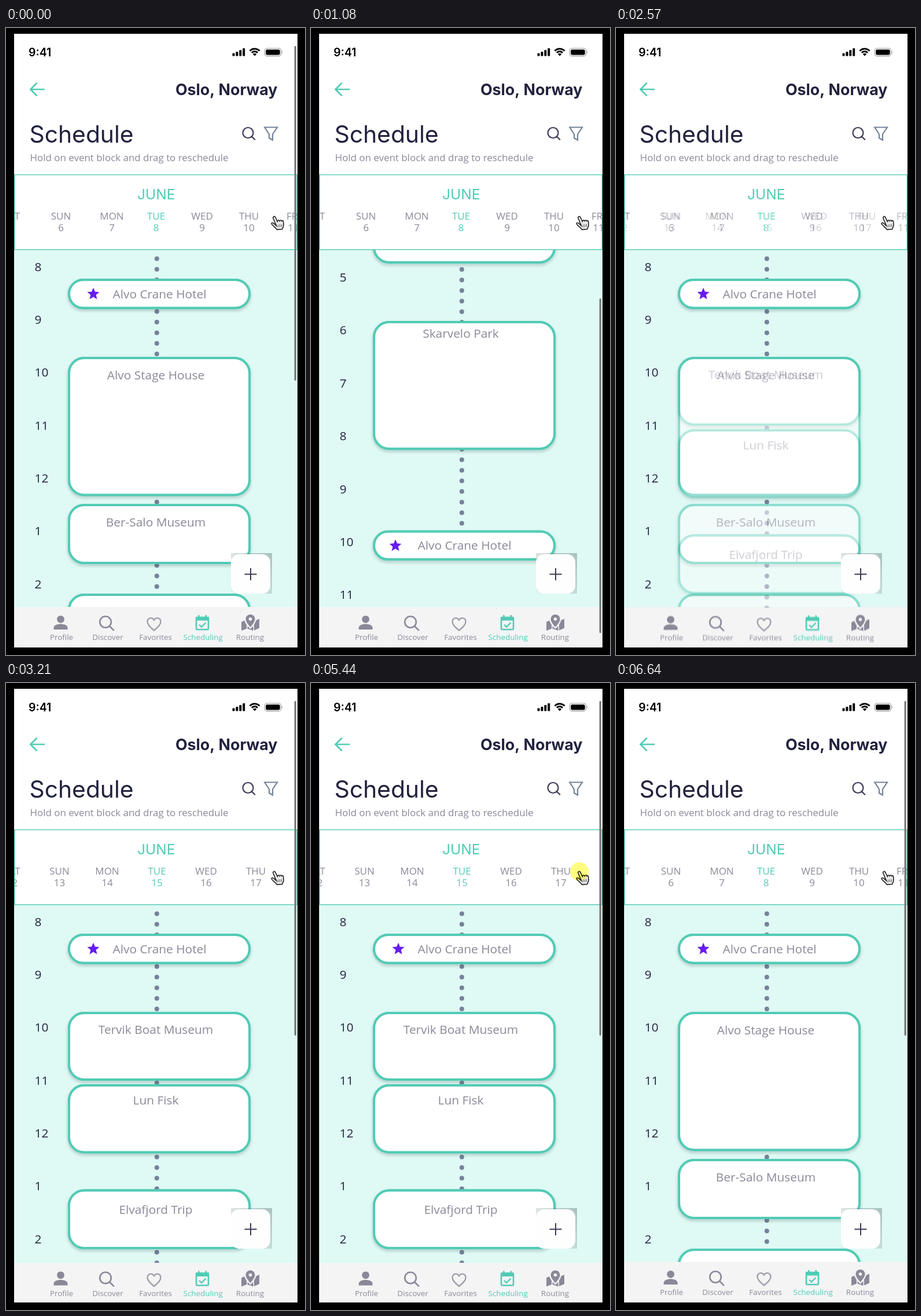
An HTML page with a canvas for the animation above (6770 ms loop, 517x1083 px).

```html
<!DOCTYPE html>
<html lang="en">
<head>
<meta charset="utf-8">
<title>Schedule</title>
<style>
html, body { margin: 0; width: 100%; height: 100%; overflow: hidden; background: #000; }
canvas { display: block; width: 517px; height: 1083px; }
</style>
</head>
<body>
<canvas id="stage"></canvas>
<script>
const W = 517, H = 1083, LOOP = 6770, MAX_SCROLL = 811;
const TEAL = '#51cbb5', INK = '#22223f', GREY = '#8b8898', SLATE = '#75829b', MINT = '#dff9f4';
const SANS = '"Open Sans", sans-serif', GEO = 'Inter, sans-serif';
const HOUR = 91.35, DOT = HOUR / 5;

const hotel = { name: 'Alvo Crane Hotel', x: 265.5, dy: 26 };
const days = [
  {
    first: 5, navY: 0,
    weekX: [10, 95, 183, 259.5, 339, 420, 497],
    events: [
      { ...hotel, top: 433, bottom: 485.5, star: 151 },
      { name: 'Alvo Stage House', top: 568, bottom: 808.5, dy: 31 },
      { name: 'Ber-Salo Museum', top: 822, bottom: 926, dy: 31 },
      { name: 'Lindmo Gallery', top: 977, bottom: 1210.5, dy: 31 },
      { name: 'Skarvelo Park', top: 1309.7, bottom: 1532.5, dy: 22 },
      { ...hotel, top: 1671.5, bottom: 1723.5, star: 146 }
    ]
  },
  {
    first: 12, navY: 1.5,
    weekX: [10.5, 92.5, 175, 261, 346, 432, 514.5],
    events: [
      { ...hotel, top: 433, bottom: 485.5, star: 151 },
      { name: 'Tervik Boat Museum', top: 568, bottom: 687, dy: 30 },
      { name: 'Lun Fisk', top: 693, bottom: 812.5, dy: 27 },
      { name: 'Elvafjord Trip', top: 874.5, bottom: 978, dy: 35 },
      { name: 'Sundvelo Gardens', top: 1118, bottom: 1409, dy: 27 },
      { name: 'Brenntun Fortress', top: 1491.5, bottom: 1607, dy: 27 },
      { ...hotel, top: 1671.5, bottom: 1723.5, star: 146 }
    ]
  }
];

const canvas = document.getElementById('stage');
const layer = document.createElement('canvas');
const ratio = window.devicePixelRatio || 1;
for (const c of [canvas, layer]) {
  c.width = W * ratio;
  c.height = H * ratio;
}
const screen = canvas.getContext('2d'), overlay = layer.getContext('2d');
screen.scale(ratio, ratio);
overlay.scale(ratio, ratio);

function text(g, str, x, y, size, color, align = 'center', family = SANS, weight = 400) {
  g.font = `${weight} ${size}px ${family}`;
  g.fillStyle = color;
  g.textAlign = align;
  g.fillText(str, x, y);
}

function rect(g, x, y, w, h, color) {
  g.fillStyle = color;
  g.fillRect(x, y, w, h);
}

function box(g, x, y, w, h, r) {
  g.beginPath();
  g.roundRect(x, y, w, h, r);
}

function disc(g, x, y, r, color) {
  g.beginPath();
  g.arc(x, y, r, 0, Math.PI * 2);
  g.fillStyle = color;
  g.fill();
}

function stroke(g, path, color, width) {
  g.strokeStyle = color;
  g.lineWidth = width;
  g.stroke(new Path2D(path));
}

function fill(g, path, color) {
  g.fillStyle = color;
  g.fill(new Path2D(path));
}

function lens(g, x, y, r, reach, color, width) {
  g.beginPath();
  g.arc(x, y, r, 0, Math.PI * 2);
  g.moveTo(x + r * 0.71, y + r * 0.71);
  g.lineTo(x + reach, y + reach);
  g.strokeStyle = color;
  g.lineWidth = width;
  g.stroke();
}

function star(g, x, y) {
  g.beginPath();
  for (let i = 0; i < 10; i++) {
    const a = i * Math.PI / 5 - Math.PI / 2, r = i % 2 ? 4.9 : 11;
    g.lineTo(x + r * Math.cos(a), y + 0.5 + r * Math.sin(a));
  }
  g.closePath();
  g.fillStyle = '#671bf0';
  g.fill();
}

function drawEvent(g, e) {
  const h = e.bottom - e.top - 4;
  box(g, 109, e.top + 2, 312, h, Math.min(26, h / 2));
  g.save();
  g.shadowColor = 'rgba(40,70,70,.3)';
  g.shadowBlur = 5 * ratio;
  g.shadowOffsetY = 3 * ratio;
  g.strokeStyle = TEAL;
  g.lineWidth = 4;
  g.stroke();
  g.restore();
  g.fillStyle = '#fff';
  g.fill();
  g.strokeStyle = TEAL;
  g.lineWidth = 4;
  g.stroke();
  if (e.star) star(g, e.star, e.top + 26);
  text(g, e.name, e.x || 259, e.top + e.dy + 7.5, 20.87, GREY);
}

function drawSchedule(g, day, scroll) {
  g.save();
  g.beginPath();
  g.rect(14, 383, 490, 618 + day.navY);
  g.clip();
  rect(g, 14, 383, 490, 620, MINT);
  g.translate(0, -scroll);
  for (let i = 0; i < 16; i++) text(g, (i + 7) % 12 + 1, 49.5, 419.7 + i * HOUR, 20.87, INK, 'left');
  for (let i = 0; i < 70; i++) disc(g, 260.8, 398.5 + i * DOT, 4, SLATE);
  day.events.forEach(e => drawEvent(g, e));
  g.restore();
}

function drawAddButton(g) {
  const shade = g.createLinearGradient(389, 977, 460, 907);
  shade.addColorStop(0, 'rgba(70,95,95,.02)');
  shade.addColorStop(1, 'rgba(70,95,95,.36)');
  rect(g, 389, 907, 71, 70, shade);
  box(g, 389, 909, 68, 68, 14);
  g.fillStyle = '#fefefe';
  g.fill();
  stroke(g, 'M412.5 943.5H433.5M423 933V954', '#3a3850', 2);
}

function drawWeek(g, day) {
  rect(g, 14, 253, 490, 130, '#fff');
  g.save();
  g.beginPath();
  g.rect(14, 253, 490, 130);
  g.clip();
  text(g, 'JUNE', 259.7, 296, 24.5, TEAL, 'center', GEO);
  ['SAT', 'SUN', 'MON', 'TUE', 'WED', 'THU', 'FRI'].forEach((name, i) => {
    const color = i === 3 ? TEAL : GREY, x = day.weekX[i];
    text(g, name, x, 331, 16.95, color);
    text(g, day.first + i, x, 350.5, 16.95, color);
  });
  g.restore();
  g.strokeStyle = TEAL;
  g.lineWidth = 1.4;
  g.strokeRect(14.7, 253.5, 488.6, 129.3);
}

function drawNav(g, y) {
  rect(g, 14, 1000 + y, 490, 70 - y, '#f4f4f5');
  g.save();
  g.translate(0, y);
  disc(g, 94.5, 1021.3, 6.4, GREY);
  fill(g, 'M82.5 1039V1036C82.5 1031.5 89 1029.5 94.5 1029.5S106.5 1031.5 106.5 1036V1039Z', GREY);
  lens(g, 172, 1026, 9.8, 14.8, GREY, 2.6);
  stroke(g, 'M256 1040.5C249 1034.5 244.5 1030.5 244.5 1025.5C244.5 1018.5 252.5 1017 256 1022.5' +
    'C259.5 1017 267.5 1018.5 267.5 1025.5C267.5 1030.5 263 1034.5 256 1040.5Z', '#a19fab', 2.4);
  box(g, 329, 1018, 21, 21, 2);
  g.strokeStyle = TEAL;
  g.lineWidth = 2.6;
  g.stroke();
  rect(g, 328, 1017, 23, 6.5, TEAL);
  rect(g, 332, 1014, 2.6, 4, TEAL);
  rect(g, 344.5, 1014, 2.6, 4, TEAL);
  stroke(g, 'M334 1030.5L338 1034.5L345.5 1027', TEAL, 2.4);
  fill(g, 'M407 1026L412 1023.5Q414 1028 416 1031V1037.5L407 1041Z' +
    'M417.5 1033L422.5 1038L427.5 1033V1041L417.5 1037.5Z' +
    'M429 1030.5Q432 1026 432.5 1023L438 1020.5V1036.5L429 1040.5Z', GREY);
  fill(g, 'M422.5 1035C418 1029.5 414.5 1025 414.5 1021A8 8 0 0 1 430.5 1021C430.5 1025 427 1029.5 422.5 1035Z', GREY);
  disc(g, 422.5, 1021, 2.8, '#f4f4f5');
  [['Profile', 96], ['Discover', 176], ['Favorites', 258.5], ['Scheduling', 340.7], ['Routing', 422]]
    .forEach(([name, x], i) => text(g, name, x, 1057, 13.4, i === 3 ? TEAL : GREY));
  g.restore();
}

function drawStatus(g) {
  text(g, '9:41', 39, 48.5, 19.5, '#000', 'left', GEO, 600);
  [5, 7.5, 10.5, 13.5].forEach((h, i) => {
    box(g, 391.5 + i * 5.9, 48.5 - h, 4, h, 1);
    g.fillStyle = '#000';
    g.fill();
  });
  g.strokeStyle = '#000';
  g.lineWidth = 2.8;
  for (const r of [7, 11.7]) {
    g.beginPath();
    g.arc(430, 47.5, r, -Math.PI * 0.76, -Math.PI * 0.24);
    g.stroke();
  }
  fill(g, 'M430 48.5L426.8 45Q430 42.5 433.2 45Z', '#000');
  box(g, 447.2, 35.2, 28.5, 13.3, 4);
  g.strokeStyle = '#a5a5a5';
  g.lineWidth = 1.3;
  g.stroke();
  box(g, 449.2, 37.2, 24.5, 9.3, 2.3);
  g.fillStyle = '#000';
  g.fill();
  fill(g, 'M477 39.5Q479.4 41.8 477 44.2Z', '#a5a5a5');
}

function drawHeader(g) {
  rect(g, 14, 10, 490, 243, '#fff');
  drawStatus(g);
  stroke(g, 'M67 106H42.5M53.5 94.8L42.3 106L53.5 117.2', TEAL, 2.7);
  text(g, 'Oslo, Norway', 469.5, 116, 26.8, INK, 'right', GEO, 700);
  text(g, 'Schedule', 40.5, 197.5, 40.8, INK, 'left', GEO);
  text(g, 'Hold on event block and drag to reschedule', 41.5, 229.5, 16.95, GREY, 'left');
  lens(g, 418.5, 181, 9, 12.3, '#3d3b58', 2.2);
  stroke(g, 'M447.3 171.5H469L461 183.5V193.5L455 190V183.5Z', SLATE, 2.2);
}

function drawPage(g, day, scroll) {
  rect(g, 0, 0, W, H, '#000');
  drawSchedule(g, day, scroll);
  drawAddButton(g);
  drawHeader(g);
  drawWeek(g, day);
  drawNav(g, day.navY);
}

function drawPointer(g, pressed) {
  const hand = 'M467.5 341.5L462 328.8C461 325.5 464.3 324.2 465.8 327L469.3 334' +
    'C470 331.6 472.4 331.6 473.2 333.3C474.3 331.4 476.2 331.8 476.8 333.4C478.3 332.2 479.5 333 479.7 335' +
    'L480 341C479.8 344 478 345.5 477.5 347.5L468.5 348.3C467 345.5 461.5 342 459.3 338.6C458.5 336.5 461 335.8 462.6 337.2Z';
  fill(g, hand, '#e9e9e9');
  stroke(g, hand, '#222', 1.6);
  stroke(g, 'M470.5 339.5L471 344M473.5 339.2L473.8 343.8M476.5 338.8V343.5', '#555', 1);
  if (!pressed) return;
  g.save();
  g.globalCompositeOperation = 'multiply';
  disc(g, 464, 325.5, 16, '#fffc80');
  g.restore();
}

// Holds time at the start of each of n evenly spaced steps.
function hold(t, from, to, n) {
  if (t < from) return 0;
  const step = (to - from) / (n - 1);
  return Math.min(to, from + Math.floor((t - from) / step + 1e-6) * step);
}

function ease(t, from, to) {
  const u = Math.min(1, Math.max(0, (t - from) / (to - from)));
  return u < 0.5 ? 2 * u * u : 1 - 2 * (1 - u) * (1 - u);
}

function scrollAt(t) {
  if (t < 1080) return MAX_SCROLL * ease(hold(t, 150, 700, 8), 90, 700);
  if (t < 3810) return MAX_SCROLL * (1 - ease(hold(t, 1080, 1400, 5), 1057, 1400));
  if (t < 3990) return 298;
  return MAX_SCROLL * (1 - ease(hold(t, 4590, 4860, 4), 4572.5, 4860));
}

const within = (t, from, to) => t >= from && t < to;

function render(t) {
  const scroll = scrollAt(t);
  const mix = t < 2240 ? 0 : t < 5890 ? ease(t, 2170, 3060) : 1 - ease(t, 5830, 6600);
  drawPage(screen, days[mix === 1 ? 1 : 0], scroll);
  if (mix > 0 && mix < 1) {
    drawPage(overlay, days[1], scroll);
    screen.globalAlpha = mix;
    screen.drawImage(layer, 0, 0, W, H);
    screen.globalAlpha = 1;
  }
  if (!within(t, 2240, 3210) && !within(t, 5890, 6640)) {
    box(screen, 498.6, 31 + scroll * 440 / MAX_SCROLL, 3.2, 578, 1.6);
    screen.fillStyle = '#777';
    screen.fill();
  }
  drawPointer(screen, within(t, 2010, 2240) || within(t, 5440, 5730));
}

const start = performance.now();
function frame() {
  render((performance.now() - start) % LOOP);
  requestAnimationFrame(frame);
}
frame();
</script>
</body>
</html>
```
